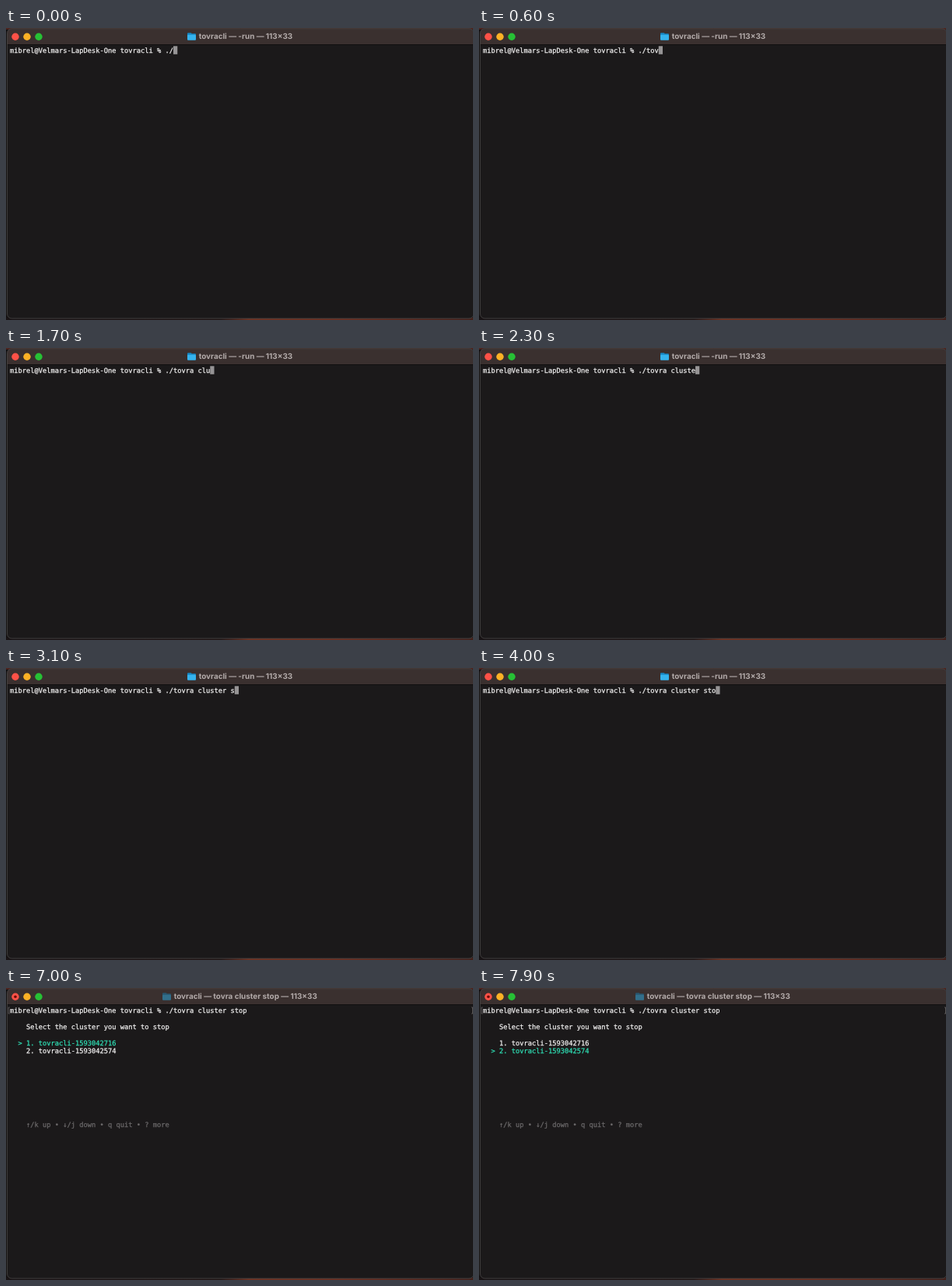
Recreate the animation shown at these times as an HTML page with a canvas. Size 600 by 376 pixels, loop 8000 ms.

```html
<!DOCTYPE html>
<html lang="en">
<head>
<meta charset="utf-8">
<title>Terminal</title>
<style>
  html, body { margin: 0; width: 100%; height: 100%; overflow: hidden; background: #111; }
  canvas { display: block; width: 600px; height: 376px; }
</style>
</head>
<body>
<canvas id="stage" width="600" height="376"></canvas>
<script>
const ctx = document.getElementById('stage').getContext('2d');
const LOOP = 8000, CELL = 5.25, ROW = 10.5, LEFT = 5, TOP = 23.3;
const ENTER = 4400, LIST = 7000, MOVE = 7700;
const WHITE = '#f2f1f1', TEAL = '#2fdfb5', GREY = '#6c6a6b';

const prompt = 'mibrel@Velmars-LapDesk-One tovracli % ';
const command = './tovra cluster stop';
// Time at which each character after "./" appears
const keys = [200, 400, 600, 800, 1000, 1200, 1300, 1500, 1600, 1800,
              2000, 2200, 2400, 2600, 2900, 3200, 3800, 4200];
const clusters = ['1. tovracli-1593042716', '2. tovracli-1593042574'];

function rect(x, y, w, h, color) {
  ctx.fillStyle = color;
  ctx.fillRect(x, y, w, h);
}

function disc(x, y, r, color) {
  ctx.fillStyle = color;
  ctx.beginPath();
  ctx.arc(x, y, r, 0, 7);
  ctx.fill();
}

// Text on the terminal's character grid
function print(text, col, row, color = WHITE) {
  ctx.font = '8.72px "DejaVu Sans Mono", monospace';
  ctx.fillStyle = ctx.strokeStyle = color;
  ctx.lineWidth = 0.25;
  [...text].forEach((ch, i) => {
    const x = LEFT + (col + i) * CELL, y = TOP + row * ROW + 8.2;
    ctx.fillText(ch, x, y);
    ctx.strokeText(ch, x, y);
  });
}

function cursor(col, row) {
  rect(LEFT + col * CELL, TOP + row * ROW, CELL, ROW, '#969495');
}

function bracket(x, dir) {
  ctx.strokeStyle = '#777475';
  ctx.lineWidth = 0.7;
  ctx.beginPath();
  ctx.moveTo(x + dir * 1.5, 25);
  ctx.lineTo(x, 25);
  ctx.lineTo(x, 33);
  ctx.lineTo(x + dir * 1.5, 33);
  ctx.stroke();
}

function folder(x, tab, body) {
  ctx.fillStyle = tab;
  ctx.beginPath();
  ctx.roundRect(x, 6.3, 5.5, 4, 1);
  ctx.roundRect(x, 7.3, 11, 5, 1);
  ctx.fill();
  ctx.fillStyle = body;
  ctx.beginPath();
  ctx.roundRect(x, 8.7, 11, 7, 1);
  ctx.fill();
}

function desktop() {
  rect(0, 0, 600, 376, '#141112');
  rect(0, 0, 600, 2, '#4c241e');
  const glow = ctx.createLinearGradient(0, 0, 600, 0);
  glow.addColorStop(0, '#181315');
  glow.addColorStop(0.46, '#201516');
  glow.addColorStop(0.52, '#703020');
  glow.addColorStop(0.72, '#6a2d20');
  glow.addColorStop(1, '#42201b');
  rect(0, 373, 600, 3, glow);
}

function frame(running) {
  ctx.save();
  ctx.beginPath();
  ctx.roundRect(1.5, 0.8, 599.5, 373.2, 6);
  ctx.clip();
  rect(0, 0, 600, 376, '#1b191a');
  rect(0, 0, 600, 21, '#3a302f');
  rect(0, 21, 600, 0.8, '#0e0c0d');
  ctx.restore();
  ctx.strokeStyle = '#4b4848';
  ctx.lineWidth = 0.8;
  ctx.beginPath();
  ctx.roundRect(1.5, 0.8, 599.5, 373.2, 6);
  ctx.stroke();

  ['#fd5147', '#fcb125', '#27c035'].forEach((c, i) => disc(12 + 15 * i, 11.3, 4.7, c));
  if (running) disc(12, 11.3, 1.8, '#6d0b08');

  const x = running ? 201 : 233;
  if (running) folder(x, '#28566f', '#326f8b');
  else folder(x, '#1687c4', '#35b3ee');
  ctx.font = '700 9.9px Inter, sans-serif';
  ctx.fillStyle = '#b3abaa';
  const job = running ? command.slice(2) : '-run';
  ctx.fillText(`tovracli — ${job} — 113×33`, x + 14.7, 14.4);
}

function draw(t) {
  const running = t >= ENTER;
  const typed = command.slice(0, 2 + keys.filter(k => k <= t).length);
  desktop();
  frame(running);
  print(prompt + typed, 0, 0);

  if (!running) {
    cursor(prompt.length + typed.length, 0);
    return;
  }
  bracket(3.2, 1);
  bracket(599.5, -1);
  if (t < LIST) {
    cursor(0, 1);
    return;
  }
  const chosen = t < MOVE ? 0 : 1;
  print('Select the cluster you want to stop', 4, 2);
  clusters.forEach((name, i) => {
    const on = i === chosen;
    print((on ? '> ' : '  ') + name, 2, 4 + i, on ? TEAL : WHITE);
  });
  print('↑/k up • ↓/j down • q quit • ? more', 4, 14, GREY);
}

ctx.textRendering = 'geometricPrecision';
const start = performance.now();
function tick() {
  draw((performance.now() - start) % LOOP);
  requestAnimationFrame(tick);
}
tick();
</script>
</body>
</html>
```
